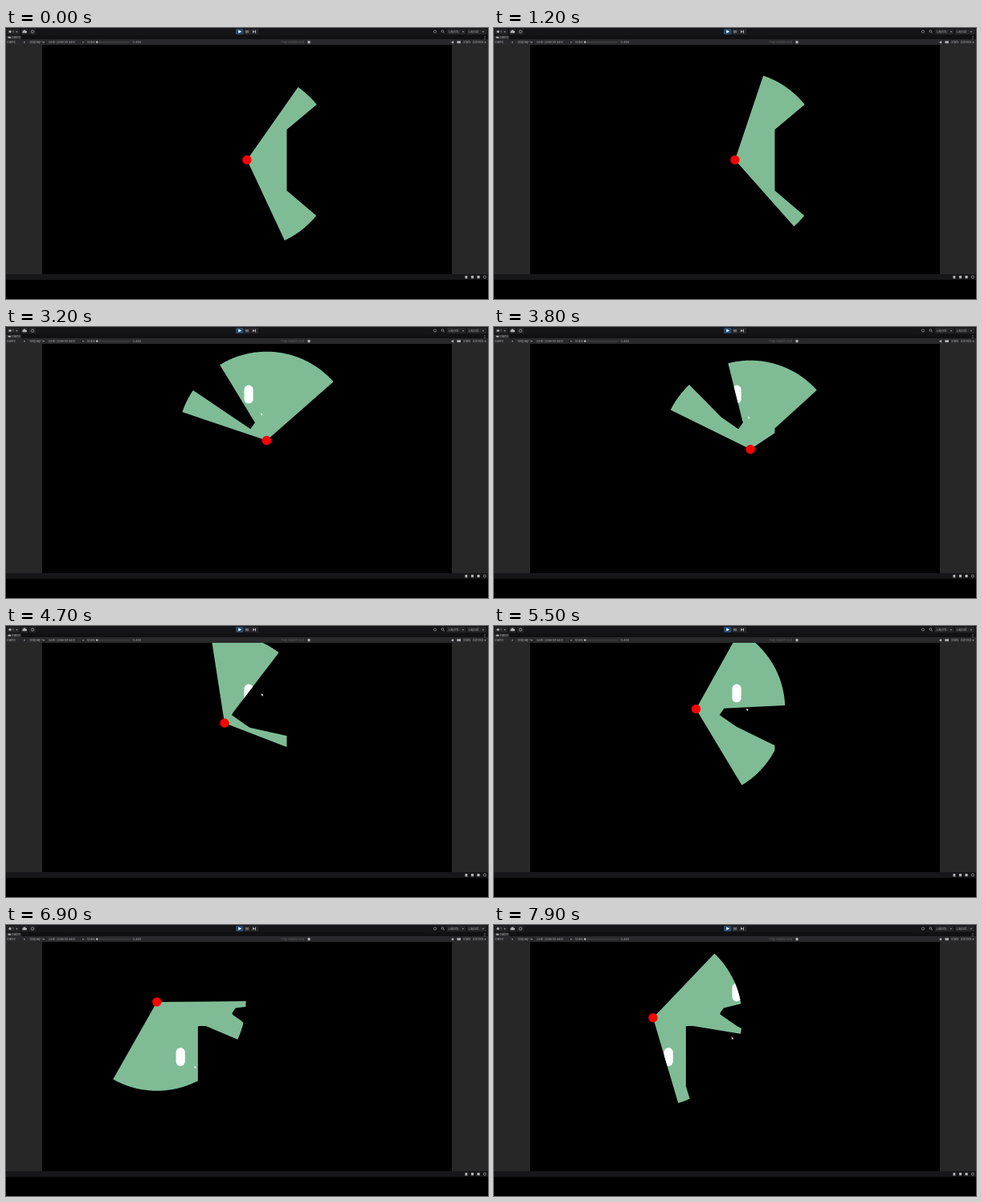
Recreate the animation shown at these times as an HTML page. Size 600 by 338 pixels, loop 8000 ms.

```html
<!DOCTYPE html>
<html lang="en">
<head>
<meta charset="utf-8">
<title>Field of view</title>
<style>
html, body { margin: 0; width: 100%; height: 100%; overflow: hidden; background: #000; }
svg { display: block; width: 100%; height: 100%; }
text { font: 3.9px Inter, Arial, sans-serif; fill: #a4a4a4; }
.icon { fill: #b4b4b4; }
.line { fill: none; stroke: #a4a4a4; stroke-width: .7; }
</style>
</head>
<body>
<svg viewBox="0 0 600 338">
  <defs>
    <clipPath id="view"><rect x="45" y="21" width="510" height="286"/></clipPath>
    <clipPath id="seen"><polygon id="seenShape"/></clipPath>
  </defs>
  <rect width="600" height="338"/>

  <rect width="600" height="21" fill="#151416"/>
  <rect y="9" width="600" height="5" fill="#111113"/>
  <rect y="9.4" width="19" height="4.6" fill="#29292b"/>
  <rect y="14" width="600" height="7" fill="#29292b"/>
  <path d="M0 21h45v286H0zM555 21h45v286h-45z" fill="#272727"/>
  <rect y="307" width="600" height="7" fill="#171719"/>
  <path d="M1 1h16v7H1zM19 1h8v7h-8zM29 1h8v7h-8zM296 1h18v7h-18zM549 1h23v7h-23zM574 1h24v7h-24z" fill="#252527"/>

  <rect x="286" y="1" width="9.5" height="7" rx="1" fill="#24496d"/>
  <path d="M289.3 2.5l4 2-4 2z" fill="#fff"/>
  <path class="icon" d="M298.5 3h1v3.2h-1zM300.6 3h1v3.2h-1zM307.2 2.8l2.7 1.8-2.7 1.8zM310 2.8h1v3.6h-1z"/>
  <circle class="icon" cx="5" cy="4.5" r="1.6"/>
  <path class="icon" d="M21 6.2a1.3 1.3 0 0 1 .3-2.4 1.8 1.8 0 0 1 3.4 0 1.2 1.2 0 0 1 .3 2.4z"/>
  <circle class="line" cx="33" cy="4.6" r="1.6"/>
  <circle class="line" cx="534" cy="4.5" r="1.6"/>
  <path class="line" d="M544.4 5.1l1.6 1.5M542 4a1.4 1.4 0 1 0 2.8 0a1.4 1.4 0 1 0-2.8 0"/>
  <rect class="icon" x="2.5" y="10.8" width="3.6" height="2" rx="1"/>
  <path d="M596 10v4" stroke="#b4b4b4" stroke-width=".8" stroke-dasharray=".8 .7"/>

  <path d="M112 17.7H154" stroke="#5c5c5c" stroke-width=".6"/>
  <circle class="icon" cx="113.2" cy="17.6" r="1.3"/>
  <rect class="icon" x="375.6" y="15.9" width="3" height="3.4" rx=".6"/>
  <path class="icon" d="M554.5 17h1l1.6-1.3v4l-1.6-1.3h-1z"/>
  <rect class="icon" x="561.5" y="16.2" width="4.4" height="2.9"/>
  <path class="icon" d="M571.5 309h2.8v3.5h-2.8zM579 309h3v3.2h-3zM586.5 309h3.2v3.3h-3.2z"/>
  <circle class="line" cx="596" cy="310.6" r="1.6"/>

  <text y="6"><tspan x="8">1</tspan><tspan x="12.5">▾</tspan><tspan x="551">Layers</tspan><tspan x="568">▾</tspan><tspan x="576">Layout</tspan><tspan x="593">▾</tspan></text>
  <text x="7" y="13.2">Game</text>
  <text y="19"><tspan x="1">Game</tspan><tspan x="22">▾</tspan><tspan x="29.5">Display 1</tspan><tspan x="46">▾</tspan><tspan x="53">QHD (2560x1440)</tspan><tspan x="95">▾</tspan><tspan x="100.5">Scale</tspan><tspan x="157.5">0.46x</tspan><tspan x="342.5" fill="#5c5c5c">Play Maximized</tspan><tspan x="569">Stats</tspan><tspan x="580.5">Gizmos</tspan><tspan x="595.5">▾</tspan></text>

  <g clip-path="url(#view)">
    <polygon id="fov" fill="#7fbc96"/>
    <g clip-path="url(#seen)" fill="#fff">
      <rect x="296.5" y="72.5" width="11.2" height="22.8" rx="5.6"/>
      <rect x="211.6" y="153" width="11.2" height="22.8" rx="5.6"/>
    </g>
    <circle id="viewer" r="5.7" fill="#f00"/>
    <path id="cursor" d="M0 0v3l.7-.5.5 1 .6-.3-.4-1h.9z" fill="#fff"/>
  </g>
</svg>
<script>
const LOOP = 8000, STEP = 100, RANGE = 110.8, HALF = 60, EDGE = 0.6;
const rad = Math.PI / 180;
const $ = id => document.getElementById(id);

// the viewer walks between these points and always faces the pointer
const key = (time, x, y, px, py) => ({ time, pose: [x, y, px, py] });
const keys = [
  key(0, 300, 164.5, 380, 171.5),
  key(100, 300, 164.5, 380, 152.4),
  key(1100, 300, 164.5, 380, 152.4),
  key(1200, 300, 164.5, 380, 148.2),
  key(1400, 300, 164.5, 372, 171),
  key(2000, 300, 157.5, 340, 119),
  key(2700, 334, 138, 335, 109),
  key(2900, 327, 136, 318, 105),
  key(3800, 319.2, 152.5, 316.5, 111.3),
  key(4700, 272, 121, 318, 84),
  key(5500, 251.5, 103.5, 314.5, 102.5),
  key(6500, 208, 87.5, 243, 129),
  key(6900, 187.8, 96, 234.6, 175.5),
  key(7500, 186, 126, 240, 172),
  key(7900, 198, 115.8, 295.8, 139.5)
];

function block(cx, cy, w, h, angle = 0) {
  const c = Math.cos(angle * rad), s = Math.sin(angle * rad);
  return [[-1, -1], [1, -1], [1, 1], [-1, 1]].map(([i, j]) => {
    const u = i * w / 2, v = j * h / 2;
    return [cx + u * c - v * s, cy + u * s + v * c];
  });
}

// two mirrored pillars and a tilted bar, all black on black
const walls = [
  block(355.3, 164.8, 11.6, 77.6),
  block(244.7, 164.8, 11.6, 77.6),
  block(295.4, 114.9, 28.7, 10.3, 34.9)
];
const corners = walls.flat();
const sides = walls.flatMap(w => w.map((p, i) => [p, w[(i + 1) % w.length]]));

function poseAt(t) {
  const i = keys.findIndex(k => k.time > t);
  if (i < 0) return keys[keys.length - 1].pose;
  const a = keys[i - 1], b = keys[i];
  const f = (t - a.time) / (b.time - a.time);
  return a.pose.map((v, n) => v + (b.pose[n] - v) * f);
}

function castRay(x, y, angle) {
  const dx = Math.cos(angle), dy = Math.sin(angle);
  let reach = RANGE;
  for (const [[ax, ay], [bx, by]] of sides) {
    const ex = bx - ax, ey = by - ay;
    const det = dx * ey - dy * ex;
    if (Math.abs(det) < 1e-9) continue;
    const px = ax - x, py = ay - y;
    const dist = (px * ey - py * ex) / det;
    const along = (px * dy - py * dx) / det;
    if (dist > 0 && dist < reach && along >= 0 && along <= 1) reach = dist;
  }
  return [x + dx * reach, y + dy * reach];
}

function fovPoints(x, y, facing) {
  let offsets = [];
  for (let a = -HALF; a <= HALF; a++) offsets.push(a);
  for (const [cx, cy] of corners) {
    let a = (Math.atan2(cy - y, cx - x) - facing) / rad;
    a -= 360 * Math.round(a / 360);
    // one ray on each side of the corner, none between them
    offsets = offsets.filter(o => Math.abs(o) === HALF || Math.abs(o - a) >= EDGE);
    offsets.push(...[a - EDGE, a + EDGE].filter(o => Math.abs(o) < HALF));
  }
  offsets.sort((a, b) => a - b);
  return [[x, y], ...offsets.map(o => castRay(x, y, facing + o * rad))];
}

function draw(t) {
  const [x, y, px, py] = poseAt(t);
  const points = fovPoints(x, y, Math.atan2(py - y, px - x))
    .map(p => p.map(v => v.toFixed(2)).join()).join(" ");
  $("fov").setAttribute("points", points);
  $("seenShape").setAttribute("points", points);
  $("viewer").setAttribute("transform", `translate(${x} ${y})`);
  $("cursor").setAttribute("transform", `translate(${px} ${py})`);
  $("cursor").style.display = t < 1300 ? "none" : "";
}

const start = performance.now();
function tick() {
  const t = (performance.now() - start) % LOOP;
  draw(Math.floor(t / STEP) * STEP);
  requestAnimationFrame(tick);
}
tick();
</script>
</body>
</html>
```
